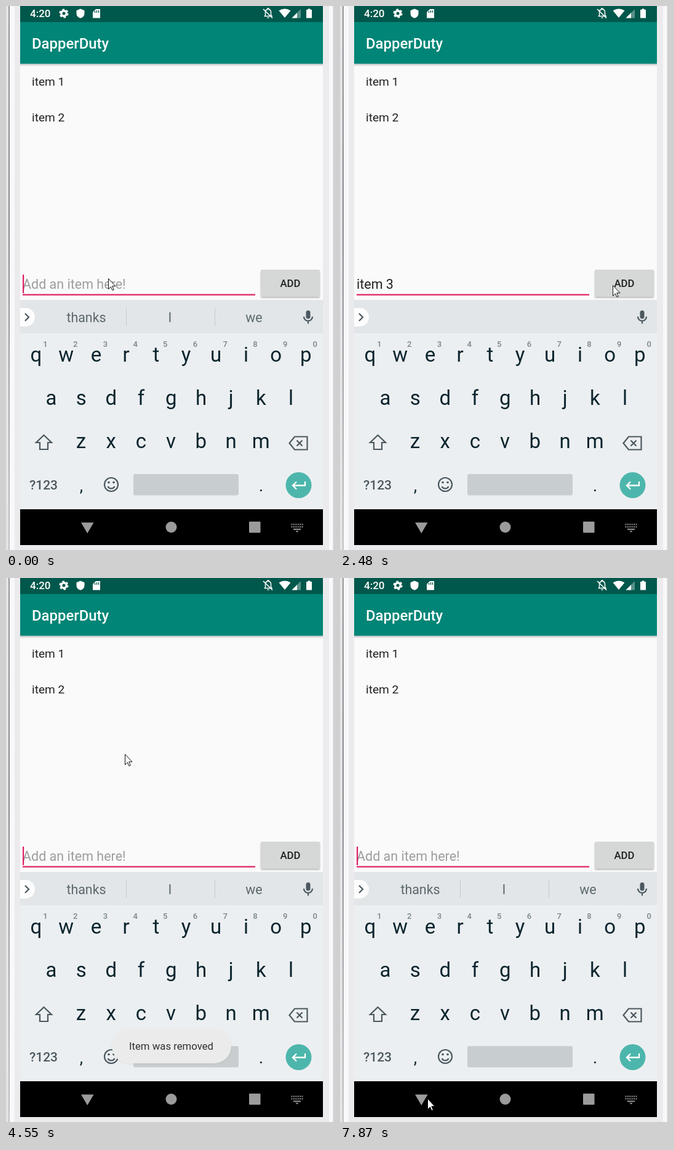
Recreate the animation shown at these times as an HTML page. Size 533x881 px, loop 8000 ms.

```html
<!DOCTYPE html>
<html lang="en">
<head>
<meta charset="utf-8">
<title>To-do list</title>
<style>
  html, body { margin: 0; width: 100%; height: 100%; overflow: hidden; background: #f8f8fa; }
  svg { display: block; width: 533px; height: 881px; }
  text { font-family: Roboto, sans-serif; white-space: pre; }
  .mid { text-anchor: middle; }
  .medium { font-weight: 500; }
  .item { font-size: 19.15px; fill: #202020; }
  .entry { font-size: 21.5px; fill: #212121; }
  .hint { fill: #9d9d9d; }
  .word { font-size: 21.4px; fill: #5c686e; }
  .word.best { font-weight: 700; fill: #0a0a0a; }
  .key { font-size: 33px; fill: #0b252e; }
  .digit { font-size: 13px; font-weight: 500; fill: #78848a; }
  .icon { fill: none; stroke: #4b585f; stroke-width: 2.2; }
</style>
</head>
<body>
<svg viewBox="0 0 533 881">
  <defs>
    <linearGradient id="edge" x2="0" y2="1">
      <stop stop-color="#98989b"/><stop offset=".4" stop-color="#88888c"/><stop offset="1" stop-color="#c2c2c5"/>
    </linearGradient>
    <linearGradient id="drop" x2="0" y2="1">
      <stop stop-color="#000" stop-opacity=".24"/><stop offset="1" stop-color="#000" stop-opacity="0"/>
    </linearGradient>
    <filter id="soft" x="-10%" y="-20%" width="120%" height="150%">
      <feDropShadow dx="0" dy="1.5" stdDeviation="1.2" flood-opacity=".3"/>
    </filter>
    <filter id="faint" x="-10%" y="-20%" width="120%" height="150%">
      <feDropShadow dx="0" dy="1" stdDeviation="1.5" flood-opacity=".07"/>
    </filter>
  </defs>

  <!-- device frame -->
  <rect width="533" height="881" fill="#f8f8fa"/>
  <rect width="4" height="881" fill="#e4e4e7"/>
  <rect x="4" width="2" height="881" fill="url(#edge)"/>
  <rect x="14" width="511" height="881" fill="#ebebed"/>
  <rect x="531.5" width="1.5" height="881" fill="#d0d0d3"/>

  <!-- app -->
  <rect x="23" width="492" height="477" fill="#fafafa"/>
  <rect x="23" y="93" width="492" height="5" fill="url(#drop)"/>
  <rect x="23" y="26" width="492" height="67.5" fill="#008577"/>
  <rect x="23" width="492" height="26" fill="#00574b"/>
  <text x="42" y="69" font-size="23.9" class="medium" fill="#fff">DapperDuty</text>

  <!-- status bar -->
  <g fill="#fff">
    <text x="39" y="18.3" font-size="17" class="medium">4:20</text>
    <circle cx="94" cy="12" r="4.2" fill="none" stroke="#fff" stroke-width="3.4"/>
    <circle cx="94" cy="12" r="6.4" fill="none" stroke="#fff" stroke-width="2.4" stroke-dasharray="3.4 3.3"/>
    <path d="M121 4.5l6.5 2.8v4.6q0 5.6-6.5 7.8-6.500-2.200-6.500-7.800V7.300z"/>
    <path d="M146 5h7v14.500h-12V10z"/>
    <path d="M144.500 8v3m3-4v4m3-4v4" stroke="#00574b" stroke-width="1.3"/>
    <path d="M420.500 16.500h11.500l-1.500-2V10q0-4-3.500-4.500V4h-2v1.500q-3.500.5-3.500 4.500v4.500z" fill="none" stroke="#fff" stroke-width="1.500"/>
    <path d="M424 18.500h4q-2 3-4 0z"/>
    <path d="M418 5l15 14.500" stroke="#fff" stroke-width="1.700"/>
    <path d="M443.500 7.500q9.500-6 19 0L453 19z"/>
    <path d="M479 5v14.500h-14.500z" opacity=".35"/>
    <path d="M473 11v8.500h-8.500z"/>
    <path d="M490.500 4.500h4v1.500h2.500v13.500h-9V6h2.500z"/>
  </g>

  <text class="item" x="42" y="129">item 1</text>
  <text class="item" x="42" y="186.500">item 2</text>
  <text class="item" x="42" y="244" id="added">item 3</text>

  <!-- entry row -->
  <text class="entry" x="27" y="458" id="entry"></text>
  <rect x="27" y="466.500" width="378" height="2.200" fill="#df1f66"/>
  <rect id="caret" y="435" width="2.200" height="30" fill="#df1f66"/>
  <rect id="button" x="414" y="427" width="96" height="44" rx="2.500" fill="#d6d7d7" filter="url(#soft)"/>
  <text class="mid medium" x="462" y="455" font-size="16.750" fill="#202020">ADD</text>

  <!-- keyboard -->
  <rect x="23" y="476" width="492" height="54" fill="#e2e6e8"/>
  <rect x="23" y="530" width="492" height="285" fill="#eceff1"/>
  <path d="M23 489h9a15 15 0 0 1 0 30h-9z" fill="#fdfdfd"/>
  <path d="M31 498l6 6-6 6" class="icon" stroke-width="2.500"/>
  <g id="words">
    <path d="M195.500 490v28M339.500 490v28" stroke="#c3cacd"/>
    <text class="word mid" x="130.500" y="512"></text>
    <text class="word mid" x="266.500" y="512"></text>
    <text class="word mid" x="403" y="512"></text>
  </g>
  <rect x="487.500" y="493" width="7" height="13.500" rx="3.500" fill="#4b585f"/>
  <path d="M484 503a7 7 0 0 0 14 0M491 510v4.500" class="icon" stroke-width="2"/>
  <g id="keys"></g>
  <path d="M61.500 695L74 707h-6v11H55v-11h-6z" class="icon"/>
  <path d="M469 697.500h20.500v21H469l-8.500-10.500z" class="icon"/>
  <path d="M472.500 703.500l9 9m0-9l-9 9" class="icon"/>
  <text class="mid medium" x="61" y="783" font-size="21" fill="#4b585f">?123</text>
  <text class="mid" x="122.500" y="786" font-size="27" fill="#0b252e">,</text>
  <text class="mid" x="414.500" y="786" font-size="27" fill="#0b252e">.</text>
  <circle cx="171" cy="775" r="11" class="icon"/>
  <path d="M165.500 778a6 5.500 0 0 0 11 0" class="icon" stroke-width="2"/>
  <circle cx="167" cy="771.500" r="1.800" fill="#4b585f"/>
  <circle cx="175" cy="771.500" r="1.800" fill="#4b585f"/>
  <rect x="207" y="758" width="171" height="34.500" rx="3" fill="#c8cecf"/>
  <circle cx="475.500" cy="776" r="21" fill="#4db6ac"/>
  <path d="M486 770v6.500h-20m6-6l-6 6 6 6" fill="none" stroke="#fff" stroke-width="2.300"/>

  <!-- navigation bar -->
  <rect x="23" y="815" width="492" height="58" fill="#000"/>
  <g fill="#9b9b9b">
    <path d="M122 836.500h20.500L132.250 854z"/>
    <circle cx="268.500" cy="844" r="9"/>
    <rect x="395" y="835" width="18.500" height="18" rx="1"/>
    <path d="M463.500 839.500h19M463.500 843.500h19" stroke="#9b9b9b" stroke-width="2" stroke-dasharray="2 1.400"/>
    <path d="M467 847.500h12" stroke="#9b9b9b" stroke-width="2"/>
    <path d="M470.500 850h5l-2.500 2.500z"/>
  </g>

  <g id="toast">
    <rect y="730" height="56" rx="28" fill="#ebebeb" filter="url(#faint)"/>
    <text class="mid" x="268.500" y="763.500" font-size="16.750" fill="#303030"></text>
  </g>
  <path id="pointer" d="M.5.500V17.500L4.400 13.800 7 19.500 9.300 18.500 6.800 12.700H12z" fill="#fff" stroke="#111"/>
</svg>

<script>
const LOOP = 8000;
const $ = id => document.getElementById(id);

function addKeys(letters, x, y) {
  return [...letters].map((c, i) =>
    `<text class="key mid" x="${x + i * 48.7}" y="${y}">${c}</text>`).join('');
}
$('keys').innerHTML = addKeys('qwertyuiop', 49, 575.5) + addKeys('asdfghjkl', 73.5, 645.5) +
  addKeys('zxcvbnm', 122, 716) + [...'1234567890'].map((c, i) =>
    `<text class="digit mid" x="${64 + i * 48.7}" y="552">${c}</text>`).join('');

const IDLE = ['thanks', 'I', 'we'];
const ADDED = 'Item was added', REMOVED = 'Item was removed';
const at = (x, y) => ({ x, y });
const toast = (message, plate, ink) => ({ message, plate, ink });

// Each step overrides part of the running state from its time onwards.
const steps = [
  [0, { text: '', words: IDLE, composing: false, caret: true, pressed: false, third: false,
        ...at(166, 441), ...toast('', 0, 0) }],
  [150, { text: 'i', composing: true, words: ['i', 'I', "I'm"] }],
  [290, { text: 'it', words: ["it's", 'it', 'its'] }],
  [420, { text: 'ite', words: ['ite', 'item', "it's"] }],
  [570, { text: 'item', words: ['items', 'item', 'itemized'] }],
  [1100, { caret: false }],
  [1250, { text: 'item ', composing: false, caret: true, words: ['and', 'is', 'I'] }],
  [1530, { text: 'item 3', words: null }],
  [2120, { caret: false }],
  [2250, at(290, 446)],
  [2390, at(443, 452)],
  [2520, { text: '', words: IDLE, caret: true, pressed: true, third: true }],
  [2650, { pressed: false, ...at(380, 412) }],
  [2780, { ...at(245, 342), ...toast(ADDED, .3, .4) }],
  [2900, { ...at(166, 303), ...toast(ADDED, .6, .92) }],
  [3050, { caret: false, ...at(124, 246), ...toast(ADDED, 1, 1) }],
  [3170, at(122, 234)],
  [3600, { caret: true }],
  [4010, { caret: false, third: false, ...toast(ADDED, .6, .8) }],
  [4140, { ...at(126, 238), ...toast(REMOVED, .2, .3) }],
  [4280, { ...at(148, 256), ...toast(REMOVED, .6, .75) }],
  [4410, { ...at(178, 276), ...toast(REMOVED, .9, 1) }],
  [4550, { caret: true, ...at(193, 285), ...toast(REMOVED, 1, 1) }],
  [4860, at(191, 268)],
  [5000, { caret: false, ...at(184, 300) }],
  [5130, at(170, 360)],
  [5260, at(153, 420)],
  [5390, at(142, 452)],
  [5520, { caret: true, ...at(138, 460) }],
  [5800, toast(REMOVED, .85, 1)],
  [5950, toast(REMOVED, .6, .95)],
  [6090, { caret: false, ...toast(REMOVED, .25, .4) }],
  [6230, toast('', 0, 0)],
  [6520, { caret: true }],
  [7050, { caret: false }],
  [7190, at(165, 525)],
  [7320, at(215, 615)],
  [7460, at(243, 705)],
  [7600, { caret: true, ...at(222, 785) }],
  [7730, at(172, 830)],
  [7870, at(142, 843)]
];

const entry = $('entry'), wordTexts = $('words').querySelectorAll('text');
const [plate, message] = $('toast').children;
const show = (el, on) => el.setAttribute('visibility', on ? 'visible' : 'hidden');

function draw(s) {
  entry.textContent = s.text || 'Add an item here!';
  entry.classList.toggle('hint', !s.text);
  entry.style.textDecoration = s.composing ? 'underline' : 'none';
  $('caret').setAttribute('x', 27 + (s.text ? entry.getComputedTextLength() - .8 : 0));
  show($('caret'), s.caret);
  show($('added'), s.third);
  show($('words'), s.words);
  wordTexts.forEach((el, i) => {
    el.textContent = s.words ? s.words[i] : '';
    el.classList.toggle('best', i === 1 && s.composing);
  });
  $('button').setAttribute('fill', s.pressed ? '#c4c5c5' : '#d6d7d7');
  message.textContent = s.message;
  const width = s.message === ADDED ? 175 : 194;
  plate.setAttribute('width', width);
  plate.setAttribute('x', 269 - width / 2);
  plate.setAttribute('opacity', s.plate);
  message.setAttribute('opacity', s.ink);
  $('pointer').setAttribute('transform', `translate(${s.x} ${s.y})`);
}

let shown = -1;
function tick() {
  const t = performance.now() % LOOP;
  const past = steps.filter(([start]) => start <= t);
  if (past.length !== shown) {
    shown = past.length;
    draw(Object.assign({}, ...past.map(([, change]) => change)));
  }
  requestAnimationFrame(tick);
}
tick();
</script>
</body>
</html>
```
